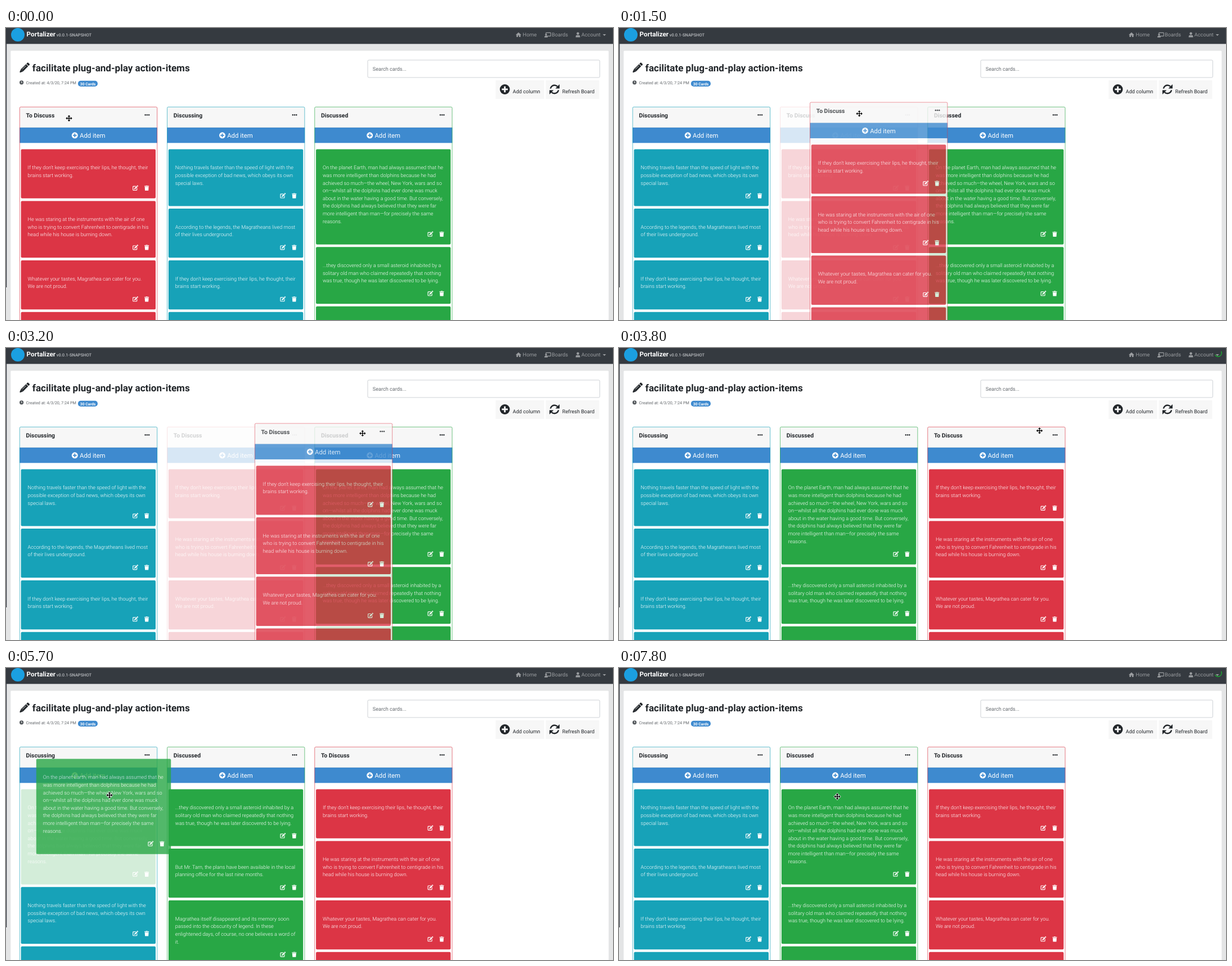
An HTML page with a canvas that plays this animation: 1079x519 px, repeating every 8000 ms.

```html
<!DOCTYPE html>
<html lang="en">
<head>
<meta charset="utf-8">
<title>Board</title>
<style>
html, body { margin: 0; width: 100%; height: 100%; overflow: hidden; background: #e4e5e6; }
canvas { display: block; width: 1079px; height: 519px; }
</style>
</head>
<body>
<canvas id="stage"></canvas>
<script>
const W = 1079, H = 519, LOOP = 8000, STEP = 100;
const DPR = window.devicePixelRatio || 1;
const BLUE = '#3e8acf', INK = '#212529', NAV = '#999c9f', PANEL = '#f7f7f7';
const LINE = 13.65, GAP = 4.6, BORDER = 0.65;
const COL_W = 245, COL_Y = 140, CARD_W = 239.4, CARD_X = 2.6, CARD_Y = 75.5;

function surface(el) {
  el.width = W * DPR;
  el.height = H * DPR;
  const c = el.getContext('2d');
  c.scale(DPR, DPR);
  c.textRendering = 'geometricPrecision';
  return c;
}
const main = surface(document.getElementById('stage'));
const layer = surface(document.createElement('canvas'));
let g = main;

const makeCard = (color, ...lines) => ({ color, lines, h: 60 + LINE * lines.length });
const RED = '#dc3545', TEAL = '#17a2b8', GREEN = '#28a745';
const lips = ["If they don't keep exercising their lips, he thought, their", 'brains start working.'];
const blank = ['', '', ''];

const planet = makeCard(GREEN,
  'On the planet Earth, man had always assumed that he',
  'was more intelligent than dolphins because he had',
  'achieved so much—the wheel, New York, wars and so',
  'on—whilst all the dolphins had ever done was muck',
  'about in the water having a good time. But conversely,',
  'the dolphins had always believed that they were far',
  'more intelligent than man—for precisely the same',
  'reasons.');

const todo = {
  title: 'To Discuss', color: RED,
  cards: [
    makeCard(RED, ...lips),
    makeCard(RED,
      'He was staring at the instruments with the air of one',
      'who is trying to convert Fahrenheit to centigrade in his',
      'head while his house is burning down.'),
    makeCard(RED, 'Whatever your tastes, Magrathea can cater for you.', 'We are not proud.'),
    makeCard(RED, ...blank)]
};
const doing = {
  title: 'Discussing', color: TEAL,
  cards: [
    makeCard(TEAL,
      'Nothing travels faster than the speed of light with the',
      'possible exception of bad news, which obeys its own',
      'special laws.'),
    makeCard(TEAL, 'According to the legends, the Magratheans lived most', 'of their lives underground.'),
    makeCard(TEAL, ...lips),
    makeCard(TEAL, ...blank)]
};
const done = {
  title: 'Discussed', color: GREEN,
  cards: [
    makeCard(GREEN,
      '...they discovered only a small asteroid inhabited by a',
      'solitary old man who claimed repeatedly that nothing',
      'was true, though he was later discovered to be lying.'),
    makeCard(GREEN, 'But Mr. Tarn, the plans have been available in the local', 'planning office for the last nine months.'),
    makeCard(GREEN,
      'Magrathea itself disappeared and its memory soon',
      'passed into the obscurity of legend. In these',
      'enlightened days, of course, no one believes a word of',
      'it.')]
};

// Drawing helpers
function text(s, x, y, size, weight, color) {
  g.font = `${weight} ${size}px Roboto, sans-serif`;
  g.fillStyle = color;
  g.fillText(s, x, y);
}
function rect(x, y, w, h, color) {
  g.fillStyle = color;
  g.fillRect(x, y, w, h);
}
function round(x, y, w, h, r, fill, stroke, width = 1) {
  g.beginPath();
  g.roundRect(x, y, w, h, r);
  if (fill) { g.fillStyle = fill; g.fill(); }
  if (stroke) { g.strokeStyle = stroke; g.lineWidth = width; g.stroke(); }
}
function dot(x, y, r, color) {
  g.beginPath();
  g.arc(x, y, r, 0, 2 * Math.PI);
  g.fillStyle = color;
  g.fill();
}
function poly(color, ...points) {
  g.beginPath();
  for (const [x, y] of points) g.lineTo(x, y);
  g.fillStyle = color;
  g.fill();
}
function line(color, width, x1, y1, x2, y2) {
  g.beginPath();
  g.moveTo(x1, y1);
  g.lineTo(x2, y2);
  g.strokeStyle = color;
  g.lineWidth = width;
  g.stroke();
}
function place(x, y, turn, fn) {
  g.save();
  g.translate(x, y);
  g.rotate(turn);
  fn();
  g.restore();
}
// Draws fn as one group with the given opacity
function group(alpha, fn) {
  if (alpha === 1) return fn();
  layer.clearRect(0, 0, W, H);
  g = layer;
  fn();
  g = main;
  g.globalAlpha = alpha;
  g.drawImage(layer.canvas, 0, 0, W, H);
  g.globalAlpha = 1;
}

// Icons
function plus(x, y, r, color, cross) {
  const a = r * 0.6, b = r * 0.16;
  dot(x, y, r, color);
  rect(x - a, y - b, 2 * a, 2 * b, cross);
  rect(x - b, y - a, 2 * b, 2 * a, cross);
}
function edit(x, y, back) {
  place(x, y, 0, () => {
    round(-4.5, -2.9, 7, 6.9, 0.8, null, '#fff', 1.15);
    line(back, 3.6, -2, 2, 4, -4);
    line('#fff', 2.2, -1.2, 1.2, 2.7, -2.7);
    line('#fff', 2.2, 3.1, -3.1, 4.2, -4.2);
    poly('#fff', [-2, 0.4], [-0.4, 2], [-2.4, 2.4]);
  });
}
function trash(x, y) {
  place(x, y, 0, () => {
    rect(-1.5, -4.6, 3, 0.8, '#fff');
    rect(-4, -4, 8, 1.2, '#fff');
    poly('#fff', [-3.5, -2.3], [3.5, -2.3], [3, 4.5], [-3, 4.5]);
  });
}
function home(x, y) {
  place(x, y, 0, () => {
    poly(NAV, [-5, 0.3], [0, -4.2], [5, 0.3], [3.6, 0.3], [3.6, 4], [-3.6, 4], [-3.6, 0.3]);
    rect(-0.9, 1.2, 1.8, 2.8, '#353a40');
  });
}
function person(x, y, r) {
  dot(x, y - r, r, NAV);
  round(x - 1.7 * r, y + 0.3 * r, 3.4 * r, 1.7 * r, [r, r, 0, 0], NAV);
}
function pencil(x, y) {
  place(x, y, Math.PI / 4, () => {
    round(-2.7, -11.2, 5.4, 3.6, [1.2, 1.2, 0, 0], INK);
    rect(-2.7, -6.7, 5.4, 13, INK);
    poly(INK, [-2.7, 6.3], [2.7, 6.3], [0.7, 11.4], [-0.7, 11.4]);
    line('#fff', 0.8, -0.8, -4.5, -0.8, 4.5);
  });
}
function sync(x, y) {
  for (const turn of [0, Math.PI]) {
    place(x, y, turn, () => {
      g.beginPath();
      g.arc(0, 0, 7.3, Math.PI * 1.06, Math.PI * 1.76);
      g.strokeStyle = INK;
      g.lineWidth = 2.4;
      g.stroke();
      poly(INK, [9, -9], [9, -1.6], [1.6, -1.6]);
    });
  }
}

function drawCard(x, y, { color, lines, h }) {
  round(x, y, CARD_W, h, 2, color);
  lines.forEach((s, i) => text(s, x + 12, y + 35.7 + i * LINE, 9.1, 300, '#fff'));
  edit(x + 203.6, y + h - 18.5, color);
  trash(x + 223.5, y + h - 18.3);
}

function drawColumn(x, y, col, cards, faded) {
  const frame = (fill, stroke) => round(x + BORDER / 2, y + 0.4, COL_W - BORDER, 460, 2, fill, stroke, BORDER);
  frame('#fff');
  rect(x, y + 0.5, COL_W, 36, PANEL);
  rect(x, y + 36.3, COL_W, BORDER, '#dfdfdf');
  text(col.title, x + 11.6, y + 18.9, 10.4, 700, INK);
  for (let i = 0; i < 3; i++) dot(x + 223.6 + 3.2 * i, y + 14.6, 1.25, INK);
  rect(x, y + 37, COL_W, 27.3, BLUE);
  plus(x + 98.3, y + 50.8, 5.5, '#fff', BLUE);
  text('Add item', x + 107, y + 55, 11.375, 400, '#fff');
  let top = y + CARD_Y;
  for (const card of cards) {
    group(card === faded ? 0.2 : 1, () => drawCard(x + CARD_X, top, card));
    top += card.h + GAP;
  }
  frame(null, col.color);
}

function drawPage() {
  rect(0, 0, W, H, '#e4e5e6');
  rect(0, 0, W, 28.3, '#353a40');
  rect(0, 0, 1.2, 461, '#30343c');
  round(7.8, 40, 1064, 500, 2, '#fff', '#dcdddf', BORDER);

  dot(21, 12, 12, '#1b9fe0');
  text('Portalizer', 36.6, 15.1, 11.7, 700, '#fff');
  text('v0.0.1-SNAPSHOT', 89.8, 15.1, 7.5, 500, '#b9bcbf');
  home(911, 12);
  text('Home', 918.6, 15.4, 9.2, 400, NAV);
  round(959.8, 8.4, 8.4, 6, 0.5, null, NAV, 1.1);
  person(960, 13.4, 1.7);
  text('Boards', 970, 15.4, 9.2, 400, NAV);
  person(1016.6, 12, 2.3);
  text('Account', 1022.8, 15.4, 9.2, 400, NAV);
  poly(NAV, [1060.8, 11], [1066.6, 11], [1063.7, 14]);

  pencil(32.8, 70.8);
  text('facilitate plug-and-play action-items', 46.8, 77.4, 17.06, 700, INK);
  dot(27.6, 96.8, 3.6, '#55595d');
  rect(27.2, 94.6, 0.8, 2.6, '#fff');
  rect(27.2, 96.6, 2, 0.8, '#fff');
  text('Created at: 4/3/20, 7:24 PM', 35.6, 99.6, 7.28, 400, '#63676b');
  round(127.8, 93.8, 35.2, 10.2, 5.1, BLUE);
  text('30 Cards', 131.8, 101.5, 6.83, 700, '#fff');

  round(643, 57, 412.5, 31, 2, '#fff', '#cdd1d5');
  text('Search cards...', 651.8, 75.9, 9.1, 400, '#666b70');
  rect(870.5, 93, 86, 33, PANEL);
  plus(886.7, 109, 8.9, INK, PANEL);
  text('Add column', 900.8, 115.8, 9.1, 400, INK);
  rect(959.5, 93, 95, 33, PANEL);
  sync(975, 109);
  text('Refresh Board', 988.8, 115.8, 9.1, 400, INK);
}

// Pointer stops: arrival ms, travel ms, x, y; each move eases out
const START = [112, 160.5];
const stops = [
  [1100, 500, 400.5, 163.7],
  [1900, 800, 431, 150.5],
  [2500, 100, 478, 158],
  [3500, 400, 747.5, 147],
  [4500, 100, 658.5, 150.5],
  [4800, 200, 413, 260],
  [5100, 200, 419, 280],
  [5700, 100, 184, 226],
  [7000, 700, 169, 270],
  [7700, 500, 388, 228.5]
];
function pointer(t) {
  let [x, y] = START;
  for (const [end, span, nx, ny] of stops) {
    const u = Math.min(1, Math.max(0, (t - end + span) / span));
    const k = 1 - (1 - u) ** 3;
    x += (nx - x) * k;
    y += (ny - y) * k;
  }
  return [x, y];
}

const slot = i => 24 + 262.2 * i;
const columnDrags = [
  { from: 700, swap: 1100, to: 2400, slot: 0 },
  { from: 3200, swap: 3300, to: 3800, slot: 1 }
];
const cardDrags = [
  { from: 5700, swap: 5700, to: 6100, slot: 1 },
  { from: 7300, swap: 7500, to: 7800, slot: 0 }
];
const drags = [...columnDrags, ...cardDrags];
const active = (list, t) => list.find(d => t >= d.from && t < d.to);
const swaps = (list, t) => list.filter(d => t >= d.swap).length;

function drawGhost(drag, t) {
  const [x, y] = pointer(t), [gx, gy] = pointer(drag.from - STEP);
  const left = slot(drag.slot) + x - gx, top = COL_Y + y - gy;
  group(0.8, () => columnDrags.includes(drag)
    ? drawColumn(left, top, todo, todo.cards)
    : drawCard(left + CARD_X, top + CARD_Y, planet));
}

// Turning half ring shown for a moment after each drop
function drawSpinner(t) {
  const drop = drags.find(d => t >= d.to && t < d.to + 500);
  if (!drop) return;
  const a = -Math.PI / 6 + (t - drop.to) / 400 * 2 * Math.PI;
  g.beginPath();
  g.arc(1065, 9, 6.2, a, a + Math.PI);
  g.strokeStyle = '#17c62ccc';
  g.lineWidth = 1.4;
  g.stroke();
}

function drawPointer(t) {
  const arm = [[-0.7, -0.7], [-0.7, -3.1], [-2.5, -3.1], [0, -5.7], [2.5, -3.1], [0.7, -3.1]];
  place(...pointer(t), 0, () => {
    g.beginPath();
    for (let i = 0; i < 4; i++) {
      for (const [x, y] of arm) g.lineTo(x, y);
      g.rotate(Math.PI / 2);
    }
    g.closePath();
    g.lineJoin = 'round';
    g.strokeStyle = '#fff';
    g.lineWidth = 1.4;
    g.stroke();
    g.fillStyle = '#000';
    g.fill();
  });
}

function draw(t) {
  const drag = active(drags, t);
  const movingColumn = active(columnDrags, t) && todo;
  const movingCard = active(cardDrags, t) && planet;
  const order = [doing, done];
  order.splice(swaps(columnDrags, t), 0, todo);
  const host = swaps(cardDrags, t) === 1 ? doing : done;

  drawPage();
  drawSpinner(t);
  order.forEach((col, i) => {
    const cards = col === host ? [planet, ...col.cards] : col.cards;
    group(col === movingColumn ? 0.2 : 1, () => drawColumn(slot(i), COL_Y, col, cards, movingCard));
  });
  if (drag) drawGhost(drag, t);
  drawPointer(t);
}

function tick() {
  draw(Math.floor(performance.now() % LOOP / STEP) * STEP);
  requestAnimationFrame(tick);
}
tick();
</script>
</body>
</html>
```
